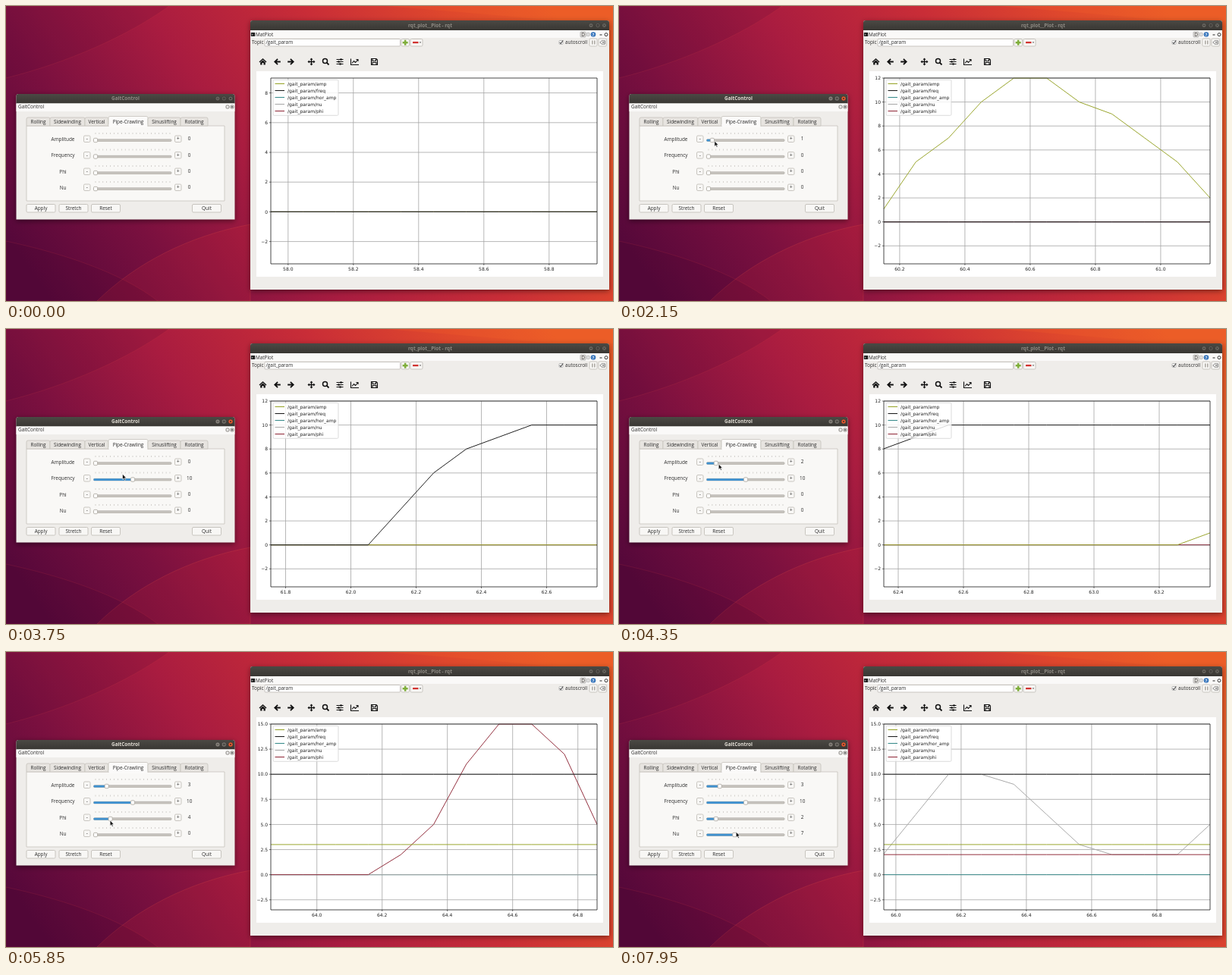
Animation of 800x389 px, one loop 8000 ms. Source, as an HTML page with a canvas:

```html
<!DOCTYPE html>
<html lang="en">
<head>
<meta charset="utf-8">
<title>Gait control</title>
<style>
html, body { margin: 0; width: 100%; height: 100%; overflow: hidden; background: #8d173f; }
canvas { display: block; width: 800px; height: 389px; }
</style>
</head>
<body>
<canvas id="stage"></canvas>
<script>
const LOOP = 8000, STEP = 50;
const UI = '6.4px "Open Sans", "Noto Sans", sans-serif';
const BOLD = 'bold ' + UI;
const PLOT = '6px "DejaVu Sans", sans-serif';

// Slider histories as [sample, value]; ten samples per second.
const series = {
  amp: [[11, 0], [12, 1], [13, 5], [16, 12], [17, 12], [20, 7], [22, 2], [23, 1], [24, 1], [25, 0], [43, 0], [44, 1], [45, 3]],
  freq: [[31, 0], [32, 3], [33, 6], [34, 8], [36, 10]],
  hor_amp: [[0, 0]],
  nu: [[69, 0], [70, 2], [72, 10], [73, 10], [74, 9], [76, 3], [77, 2], [79, 2], [80, 5], [81, 8]],
  phi: [[52, 0], [53, 2], [54, 5], [55, 11], [56, 15], [57, 15], [58, 12], [59, 5], [60, 3], [61, 2]]
};
const colors = { amp: '#9aa62f', freq: '#202020', hor_amp: '#3b8c8c', nu: '#a9a9a9', phi: '#93303f' };
const drawOrder = ['hor_amp', 'nu', 'phi', 'amp', 'freq'];
const rows = [['Amplitude', 'amp', 177], ['Frequency', 'freq', 198.5], ['Phi', 'phi', 220], ['Nu', 'nu', 241]];

// Drags: series, start ms, end ms, pointer y at start and end.
const drags = [
  ['amp', 980, 2380, 178, 178], ['freq', 2980, 3500, 197, 197], ['amp', 4180, 4420, 178, 178],
  ['phi', 5080, 5980, 222, 222], ['nu', 6780, 8000, 244, 237]
];

const canvas = document.getElementById('stage');
const dpr = window.devicePixelRatio || 1;
canvas.width = 800 * dpr;
canvas.height = 389 * dpr;
let ctx = canvas.getContext('2d');

const lerp = (a, b, p) => a + (b - a) * p;

function valueAt(name, k) {
  const pts = series[name];
  if (k <= pts[0][0]) return pts[0][1];
  for (let i = 1; i < pts.length; i++) {
    const [k0, v0] = pts[i - 1], [k1, v1] = pts[i];
    if (k <= k1) return lerp(v0, v1, (k - k0) / (k1 - k0));
  }
  return pts[pts.length - 1][1];
}
const sample = (name, k) => Math.round(valueAt(name, k));
const sliderValue = (name, t) => valueAt(name, t / 100 + 1.2);
const handleX = v => 118 + 4.9 * v;

function text(s, x, y, font = UI, color = '#2b2b2b', align = 'left') {
  ctx.font = font;
  ctx.fillStyle = color;
  ctx.textAlign = align;
  ctx.textBaseline = 'alphabetic';
  ctx.fillText(s, x, y + 2.2);
}
function rect(x, y, w, h, fill, stroke, r = 0) {
  ctx.beginPath();
  ctx.roundRect(x, y, w, h, r);
  if (fill) { ctx.fillStyle = fill; ctx.fill(); }
  if (stroke) { ctx.strokeStyle = stroke; ctx.lineWidth = 0.8; ctx.stroke(); }
}
function line(points, color, width = 1) {
  ctx.beginPath();
  points.forEach(([x, y]) => ctx.lineTo(x, y));
  ctx.strokeStyle = color;
  ctx.lineWidth = width;
  ctx.stroke();
}
function disc(x, y, r, fill, stroke, width = 0.8) {
  ctx.beginPath();
  ctx.arc(x, y, r, 0, Math.PI * 2);
  if (fill) { ctx.fillStyle = fill; ctx.fill(); }
  if (stroke) { ctx.strokeStyle = stroke; ctx.lineWidth = width; ctx.stroke(); }
}
function shape(d, x, y, fill, stroke, width = 1) {
  ctx.save();
  ctx.translate(x, y);
  const p = new Path2D(d);
  if (fill) { ctx.fillStyle = fill; ctx.fill(p); }
  if (stroke) { ctx.strokeStyle = stroke; ctx.lineWidth = width; ctx.stroke(p); }
  ctx.restore();
}
function button(x, y, w, h, label) {
  rect(x, y, w, h, '#f8f7f5', '#bdb9b3', 1.5);
  if (label) text(label, x + w / 2, y + h / 2, UI, '#2b2b2b', 'center');
}

function wallpaper() {
  const g = ctx.createLinearGradient(60, 389, 690, -40);
  [[0, '#56083a'], [0.2, '#7a103f'], [0.42, '#a91c40'], [0.65, '#c92d37'], [0.85, '#df482c'], [1, '#e85a27']]
    .forEach(([p, c]) => g.addColorStop(p, c));
  ctx.fillStyle = g;
  ctx.fillRect(0, 0, 800, 389);
  shape('M0 95C80 75 160 40 215 0H0Z', 0, 0, 'rgba(70,0,50,.12)', 'rgba(235,80,70,.13)');
  shape('M120 389C170 340 240 303 322 288V389Z', 0, 0, 'rgba(240,50,50,.13)', 'rgba(245,90,70,.2)');
  shape('M0 310C70 325 150 350 200 389H0Z', 0, 0, 'rgba(60,0,45,.15)', 'rgba(220,60,70,.15)');
  shape('M500 0C560 5 650 12 720 19H800V0Z', 0, 0, 'rgba(255,110,40,.15)');
}

function titleBar(x, y, w, h) {
  const g = ctx.createLinearGradient(0, y, 0, y + h);
  g.addColorStop(0, '#4b4944');
  g.addColorStop(1, '#393733');
  rect(x, y, w, h, g, null, [3, 3, 0, 0]);
}
function windowFrame(x, y, w, h, bar) {
  ctx.save();
  ctx.shadowColor = 'rgba(0,0,0,.45)';
  ctx.shadowBlur = 7;
  ctx.shadowOffsetY = 2;
  rect(x, y, w, h, '#efedea', null, [3, 3, 0, 0]);
  ctx.restore();
  titleBar(x, y, w, bar);
}
function titleButtons(xs, y, active) {
  xs.forEach((x, i) => {
    const close = i === 2;
    disc(x, y, 3, active && close ? '#e9592f' : active ? '#85817a' : '#66635d', '#2f2d2a', 0.5);
    if (i === 0) line([[x - 1.2, y], [x + 1.2, y]], '#2f2d2a', 0.7);
    if (i === 1) rect(x - 1, y - 1, 2, 2, null, '#2f2d2a');
    if (close) shape('M-1-1L1 1M1-1L-1 1', x, y, null, '#2f2d2a', 0.7);
  });
}

function controlWindow() {
  windowFrame(13.5, 116, 288, 165.5, 12.5);
  rect(13.5, 128.5, 288, 10.5, '#faf9f8');
  text('GaitControl', 16, 133);
  [292, 298].forEach(x => rect(x - 2, 131, 4, 4, '#eee', '#77736d', 1));
  shape('M-1-1L1 1M1-1L-1 1', 298, 133, null, '#444', 0.7);

  rect(27, 158, 261, 99, '#f9f8f6', '#c6c2bc');
  [['Rolling', 27, 58], ['Sidewinding', 58, 104], ['Vertical', 104, 135], ['Pipe-Crawling', 135, 187],
   ['Sinuslifting', 187, 230], ['Rotating', 230, 266]].forEach(([label, a, b]) => {
    const on = a === 135;
    rect(a, on ? 145.5 : 147, b - a, on ? 13 : 11, on ? '#fbfaf9' : '#e7e4e0', '#c6c2bc', [2, 2, 0, 0]);
    if (on) rect(a + 0.5, 156, b - a - 1, 4, '#fbfaf9');
    text(label, (a + b) / 2, 152.5, UI, '#2b2b2b', 'center');
  });
  rows.forEach(([label, , y]) => {
    text(label, 75, y - 1.5, UI, '#2b2b2b', 'center');
    button(102.5, y - 6, 8.5, 8.5, '-');
    button(222.5, y - 6, 8.5, 8.5, '+');
    for (let i = 0; i <= 20; i++) rect(handleX(i) - 0.3, y - 10, 0.6, 2, '#bbb8b3');
    rect(115.5, y - 1.2, 102.5, 2.6, '#c9c6c1', '#b3afa9', 1);
  });
  [['Apply', 27], ['Stretch', 70], ['Reset', 112.5], ['Quit', 245.5]].forEach(([s, x]) => button(x, 261.5, 38, 10.5, s));
}

function toolbar() {
  const ink = '#111', y = 73.5;
  shape('M-5 0L0-4.5L5 0L4 1L0-2.7L-4 1ZM-3.3 1L0-1.9L3.3 1V4H1V1.5H-1V4H-3.3Z', 338.5, y, ink);
  const arrow = 'M-4.5 0L0-4.2L1.2-3L-.8-1H4.3V1H-.8L1.2 3L0 4.2Z';
  shape(arrow, 357.5, y, ink);
  ctx.save();
  ctx.translate(375.5, y);
  ctx.scale(-1, 1);
  shape(arrow, 0, 0, ink);
  ctx.restore();
  shape('M-4 0H4M0-4V4', 402.5, y, null, ink, 1.4);
  shape('M0-5L2-2.8H-2ZM0 5L2 2.8H-2ZM-5 0L-2.8-2V2ZM5 0L2.8-2V2Z', 402.5, y, ink);
  disc(420.5, y - 1, 3, null, ink, 1.5);
  line([[422.7, y + 1.2], [425.5, y + 4]], ink, 1.8);
  [[-3, 1.5], [0, -1.5], [3, 0.5]].forEach(([dy, dx]) => {
    line([[435.5, y + dy], [444.5, y + dy]], ink, 1);
    rect(439 + dx, y + dy - 1.2, 2, 2.4, ink);
  });
  shape('M-5-4V4H5.5M-3.5 2L-1-1L1 1L4.5-3M2-3H4.5V-.5', 459.5, y, null, ink, 1.1);
  shape('M-4-4H2.5L4-2.5V4H-4ZM-2.5-4V-1H2V-4M-2.5 4V1H2.5V4', 485.5, y, null, ink, 1.1);
}

function plotWindow() {
  windowFrame(322, 19, 473, 355, 13);
  text('rqt_plot__Plot - rqt', 559, 25.5, BOLD, '#8f8b84', 'center');
  titleButtons([771, 780, 788.5], 25.5, false);
  rect(322, 32, 473, 10, '#faf9f8');
  rect(322.8, 35, 5.4, 5, '#222', null, 0.5);
  line([[324, 37], [325.2, 37.7], [324, 38.4]], '#eee', 0.6);
  text('MatPlot', 329, 37.5);
  rect(757, 34, 7, 7, '#e4e1dd', '#aaa', 1);
  text('D', 760.5, 37.5, UI, '#333', 'center');
  disc(767.2, 37.5, 2.4, '#ddd', '#bbb');
  disc(774, 37.5, 3.3, '#3c79bd');
  text('?', 774, 37.6, 'bold 5px "Open Sans", sans-serif', '#fff', 'center');
  line([[782.5, 38], [785.5, 38]], '#222', 1);
  disc(791, 37.7, 2, null, '#222', 0.9);

  text('Topic', 324, 48);
  rect(341, 43.5, 178.5, 9.5, '#fff', '#bbb7b1', 1);
  text('/gait_param', 342.5, 48);
  button(521, 43.5, 10.5, 9.5);
  shape('M-3.5 0H3.5M0-3.5V3.5', 526.2, 48.2, null, '#7fae3b', 2.5);
  button(533, 43.5, 16, 9.5);
  rect(536, 47, 7.5, 2.3, '#d1322f', null, 0.6);
  shape('M-1.2-.6H1.2L0 1Z', 546, 48, '#444');
  rect(729, 45.5, 5, 5, '#fff', '#aaa', 1);
  line([[729.8, 48], [731.2, 49.8], [734, 45.4]], '#222', 1);
  text('autoscroll', 737, 48);
  button(769, 43, 10, 10);
  [772, 775].forEach(x => rect(x, 45.5, 1.5, 5, '#aaa6a0'));
  button(781, 43, 10.5, 10);
  shape('M-3.5 0L-1.2-2.2H3.2V2.2H-1.2ZM0-1L2 1M2-1L0 1', 786.3, 48, null, '#555', 0.7);

  toolbar();
  rect(330, 86, 457, 271, '#fff');
}

function chart(t) {
  const k = Math.floor((t + 50) / 100);
  const right = 58.947 + 0.1002 * k, left = right - 1;
  let top = 9;
  for (let i = 0; i <= k; i++) for (const name of drawOrder) top = Math.max(top, sample(name, i));
  const X = time => 349 + (time - left) * 430;
  const Y = v => 95 + (top - v) / (top + 3.5) * 245;
  const dense = top + 3.5 > 18, gap = dense ? 2.5 : 2;

  for (let n = Math.ceil(left * 5); n / 5 <= right; n++) {
    const x = X(n / 5);
    line([[x, 95], [x, 340]], '#a5a5a5', 0.8);
    line([[x, 340], [x, 342]], '#111', 0.6);
    text((n / 5).toFixed(1), x, 347, PLOT, '#222', 'center');
  }
  for (let v = -gap; v <= top + 0.01; v += gap) {
    const y = Y(v);
    line([[349, y], [779, y]], '#a5a5a5', 0.8);
    line([[347, y], [349, y]], '#111', 0.6);
    text((dense ? v.toFixed(1) : String(v)).replace('-', '\u2212'), 345, y, PLOT, '#222', 'right');
  }
  ctx.save();
  ctx.beginPath();
  ctx.rect(349, 94.5, 430, 246);
  ctx.clip();
  for (const name of drawOrder) {
    const pts = [];
    for (let i = k - 11; i <= k; i++) pts.push([X(58.947 + 0.1002 * i), Y(sample(name, i))]);
    line(pts, colors[name], 1);
  }
  ctx.restore();
  rect(349, 95, 430, 245, null, '#1a1a1a');

  rect(352, 97.3, 86, 47, 'rgba(255,255,255,.82)', '#d2d2d2', 1.5);
  Object.keys(series).forEach((name, i) => {
    const y = 102.5 + 9 * i;
    line([[354.5, y], [367, y]], colors[name], 1.1);
    text('/gait_param/' + name, 371, y, PLOT, '#222');
  });
}

function sliders(t) {
  for (const [, name, y] of rows) {
    const v = Math.round(sliderValue(name, t)), x = handleX(v);
    if (v) rect(115.5, y - 1.2, x - 115.5, 2.6, '#3e91d0', null, 1);
    rect(x - 2.6, y - 2.7, 5.2, 5.4, '#fcfbfa', '#aaa69f', 1.5);
    text(String(v), 241.7, y - 2, UI, '#2b2b2b', 'center');
  }
}

function dragPoint([name, start, end, y0, y1], t) {
  return [handleX(sliderValue(name, t)) + 1.5, lerp(y0, y1, (t - start) / (end - start))];
}
function pointerAt(t) {
  const i = drags.findIndex(d => t <= d[2]);
  const next = drags[i], start = next[1];
  if (t >= start) return dragPoint(next, t);
  const prev = drags[i - 1];
  const from = prev ? dragPoint(prev, prev[2]) : [260, -12];
  const began = prev ? prev[2] : 350;
  const p = Math.max(0, (t - began) / (start - began)), e = p * p * (3 - 2 * p);
  const to = dragPoint(next, start);
  return [lerp(from[0], to[0], e), lerp(from[1], to[1], e)];
}

// Everything that never changes is painted once.
const backdrop = document.createElement('canvas');
backdrop.width = canvas.width;
backdrop.height = canvas.height;
const screen = ctx;
ctx = backdrop.getContext('2d');
ctx.scale(dpr, dpr);
wallpaper();
controlWindow();
plotWindow();
ctx = screen;
ctx.scale(dpr, dpr);

function draw(t) {
  ctx.drawImage(backdrop, 0, 0, 800, 389);
  const active = t >= 950;
  text('GaitControl', 157.5, 122, BOLD, active ? '#e3dfd6' : '#8f8b84', 'center');
  titleButtons([279, 287.3, 296], 122, active);
  sliders(t);
  chart(t);
  const [x, y] = pointerAt(t);
  shape('M0 0V7.2L1.7 5.7L2.9 8.3L4.1 7.7L2.9 5.2H5.1Z', x, y, '#111', '#fff', 0.6);
}

const began = performance.now();
function frame() {
  const t = (performance.now() - began) % LOOP;
  draw(Math.floor(t / STEP) * STEP);
  requestAnimationFrame(frame);
}
frame();
</script>
</body>
</html>
```
